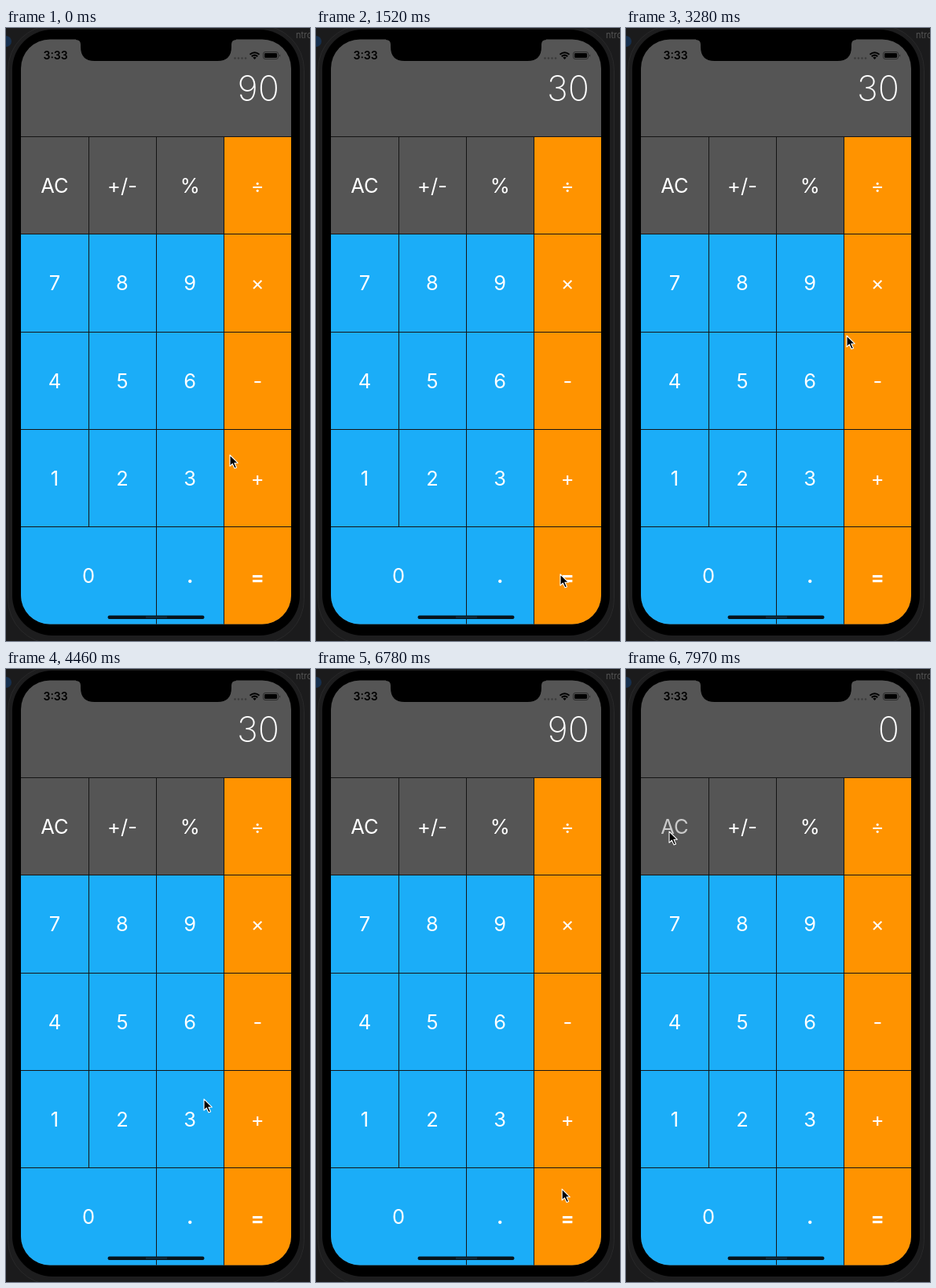
Write an HTML page that moves like this. It is 387 px wide and 781 px high and loops after 8 s.

```html
<!DOCTYPE html>
<html lang="en">
<head>
<meta charset="utf-8">
<title>Calculator</title>
<style>
  html, body { margin: 0; width: 100%; height: 100%; overflow: hidden; background: #1b1b1c; }
  svg { display: block; width: 387px; height: 781px; }
  text { font-family: Inter, Roboto, sans-serif; }
  #keys text { font-size: 25.5px; fill: #fff; text-anchor: middle; }
  #display { font-size: 45px; font-weight: 200; fill: #fff; text-anchor: end; }
</style>
</head>
<body>
<svg viewBox="0 0 387 781" xmlns="http://www.w3.org/2000/svg">
  <defs>
    <clipPath id="screen"><rect x="19" y="14.5" width="344" height="745" rx="37"/></clipPath>
  </defs>
  <rect width="387" height="781" fill="#1b1b1c"/>
  <circle cx="0" cy="17" r="7" fill="#16304f"/>
  <text x="369" y="13" font-size="11" fill="#555">ntro</text>
  <rect x="2.5" y="-3.5" width="377" height="788" rx="57" fill="#1d1d1e" stroke="#29292a"/>
  <rect x="8" y="2" width="366" height="772" rx="51" fill="#000"/>

  <g clip-path="url(#screen)">
    <rect x="19" y="14" width="344" height="746" fill="#555"/>
    <g id="keys"></g>
    <path id="grid" stroke="#141414" fill="none"/>
  </g>
  <path d="M89 14H293V15Q287 15 287 21V24Q287 42 269 42H113Q95 42 95 24V21Q95 15 89 15Z" fill="#000"/>

  <text x="47.5" y="40" font-size="14" font-weight="600">3:33</text>
  <g fill="#3c3c3c">
    <circle cx="291.5" cy="38.5" r="1.3"/><circle cx="296" cy="38.5" r="1.3"/>
    <circle cx="300.5" cy="38.5" r="1.3"/><circle cx="305" cy="38.5" r="1.3"/>
  </g>
  <g fill="none" stroke="#000" stroke-width="2">
    <path d="M310.5 33.8Q316.5 28.6 322.5 33.8M312.7 36.3Q316.5 33 320.3 36.3"/>
  </g>
  <path d="M314.3 37.7Q316.5 36 318.7 37.7L316.5 40Z"/>
  <rect x="327.5" y="30.5" width="19" height="9" rx="2.5" fill="none" stroke="#2b2b2b"/>
  <rect x="329" y="32" width="16" height="6" rx="1.3"/>
  <path d="M348 33.5Q350 35 348 36.8Z" fill="#222"/>

  <text id="display" x="348" y="93"></text>
  <rect x="129.5" y="748.5" width="123" height="4.5" rx="2.2" fill="#06131b"/>
  <rect x="178" y="749.5" width="27" height="2.5" fill="#102a3a"/>
  <path id="cursor" d="M1 1V15.3L4.3 12.2L7 18L9.5 17L6.9 11.2H11.2Z" stroke="#fff" stroke-width="1.1" stroke-linejoin="round"/>
</svg>
<script>
const LOOP = 8000, FADE = 400, DIM = 0.2;
const NS = "http://www.w3.org/2000/svg";
const $ = id => document.getElementById(id);
const cols = [19, 105, 191, 277.5, 363];
const rows = [138.5, 262.5, 387, 511.5, 635.5, 760];
const GRAY = "#555", BLUE = "#1badf8", ORANGE = "#ff9300";
const labels = {};

function add(name, attrs) {
  const el = document.createElementNS(NS, name);
  for (const k in attrs) el.setAttribute(k, attrs[k]);
  return $("keys").appendChild(el);
}

function addKey(label, row, col, span = 1) {
  const x = cols[col], w = cols[col + span] - x;
  const y = rows[row], h = rows[row + 1] - y;
  const fill = col === 3 ? ORANGE : row === 0 ? GRAY : BLUE;
  add("rect", { x, y, width: w, height: h, fill });
  const text = add("text", {
    x: x + w / 2,
    y: y + h / 2 + (label === "=" ? 11 : 9.6),
    "font-weight": label === "=" || label === "." ? 700 : 400
  });
  text.textContent = label;
  labels[label] = text;
}

[["AC", "+/-", "%", "÷"], ["7", "8", "9", "×"], ["4", "5", "6", "-"], ["1", "2", "3", "+"]]
  .forEach((line, r) => line.forEach((label, c) => addKey(label, r, c)));
addKey("0", 4, 0, 2);
addKey(".", 4, 2);
addKey("=", 4, 3);

$("grid").setAttribute("d",
  rows.slice(0, 5).map(y => `M19 ${Math.floor(y) + 0.5}H363`).join("") +
  "M105.5 138V635M191.5 138V760M277.5 138V760");

// label, press time, release time, display after release
const presses = [
  ["3", 190, 290, "3"], ["=", 980, 1090, "30"],
  ["×", 3810, 4040, "30"], ["3", 5290, 5410, "3"],
  ["=", 6170, 6220, "90"], ["AC", 7640, 7740, "0"]
];

// time, x, y; a repeated place is a rest
const path = [
  [0, 284, 543], [40, 284, 543], [170, 248, 551], [400, 248, 551], [740, 310, 695],
  [1940, 310, 695], [2160, 301, 463], [2510, 301, 463], [2575, 263, 383], [2640, 230, 400],
  [2980, 230, 400], [3120, 244, 427], [3280, 280, 391], [3420, 303, 340],
  [4120, 303, 340], [4450, 251, 547], [4890, 251, 547], [4970, 247, 548],
  [5090, 247, 548], [5140, 247, 550], [5640, 247, 550], [6020, 317, 671],
  [6760, 317, 671], [6980, 109, 266], [7290, 109, 266], [7460, 54, 206], [LOOP, 54, 206]
];

// Velocity at a key; zero next to a rest
function slope(i, axis) {
  const a = path[i - 1], b = path[i], c = path[i + 1];
  const still = (p, q) => !p || !q || (p[1] === q[1] && p[2] === q[2]);
  return still(a, b) || still(b, c) ? 0 : (c[axis] - a[axis]) / (c[0] - a[0]);
}

function cursorAt(t, axis) {
  let i = 0;
  while (i < path.length - 2 && path[i + 1][0] <= t) i++;
  const a = path[i], b = path[i + 1], dt = b[0] - a[0];
  const p = (t - a[0]) / dt, q = 1 - p;
  return a[axis] * q * q * (1 + 2 * p) + b[axis] * p * p * (3 - 2 * p) +
    dt * p * q * (slope(i, axis) * q - slope(i + 1, axis) * p);
}

function draw(t) {
  let shown = "90";
  const alpha = {};
  for (const [label, down, up, value] of presses) {
    if (t >= up) shown = value;
    if (t < down) continue;
    const p = Math.min(1, Math.max(0, (t - up) / FADE));
    alpha[label] = DIM + (1 - DIM) * p * p * (3 - 2 * p);
  }
  for (const label in labels) labels[label].setAttribute("opacity", alpha[label] ?? 1);
  if ($("display").textContent !== shown) $("display").textContent = shown;
  $("cursor").setAttribute("transform", `translate(${cursorAt(t, 1)} ${cursorAt(t, 2)})`);
}

let start;
function tick(now) {
  start ??= now;
  draw((now - start) % LOOP);
  requestAnimationFrame(tick);
}
draw(0);
requestAnimationFrame(tick);
</script>
</body>
</html>
```
